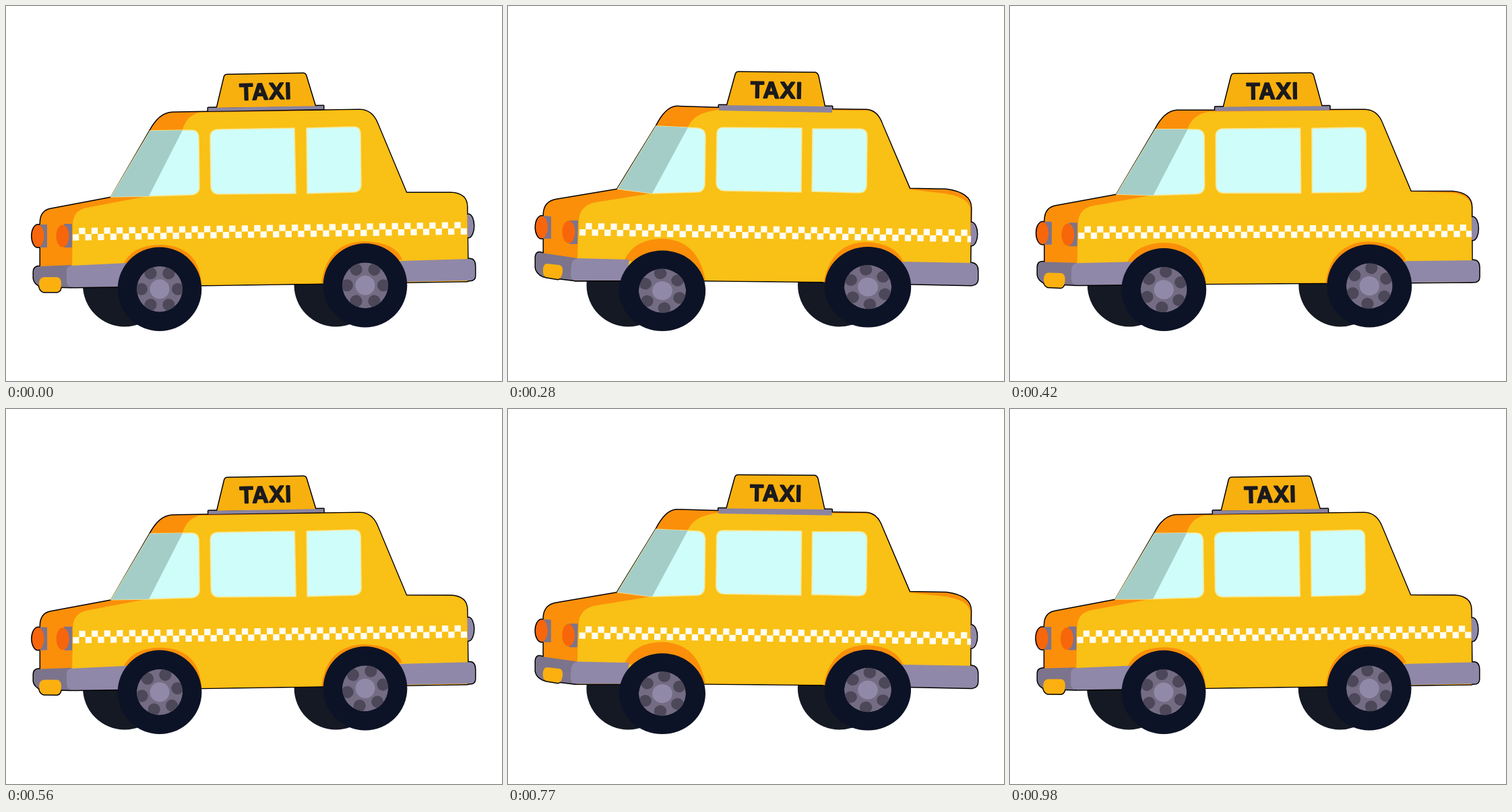
An HTML page that plays this animation: 736 px wide and 556 px high, repeating every 1.05 s.

```html
<!DOCTYPE html>
<html lang="en">
<head>
<meta charset="utf-8">
<title>Taxi</title>
<style>
  html, body { margin: 0; width: 100%; height: 100%; overflow: hidden; background: #fff; }
  svg { display: block; width: 736px; height: 556px; }
  #edge path { fill: #000; stroke: #000; stroke-width: 3; stroke-linejoin: round; }
  .glass { stroke: #f8e68f; stroke-width: 1.6; }
  text { font: 600 32.5px Inter, "Open Sans", sans-serif; text-anchor: middle; letter-spacing: .9px;
         fill: #1b1a1e; stroke: #1b1a1e; stroke-width: 2; stroke-linejoin: round; }
</style>
</head>
<body>
<svg viewBox="0 0 736 556">
  <defs>
    <clipPath id="rim"><circle r="34"/></clipPath>
    <g id="hub" clip-path="url(#rim)">
      <circle r="34" fill="#736c83"/>
      <g id="holes" fill="#4c4759"></g>
      <circle r="14.5" fill="#9189a8"/>
    </g>
  </defs>
  <g id="far"></g>
  <g id="edge"></g>
  <g id="body"></g>
  <text id="label">TAXI</text>
  <g id="wheels"></g>
</svg>
<script>
const NS = 'http://www.w3.org/2000/svg';
const $ = id => document.getElementById(id);
const FRAME = 70;
// Body tilt per step: 0 = nose down, 1 = nose up
const TILT = [0, .3, .65, .92, 1, .7, .33, .05, .03, .33, .65, .95, .95, .64, .08];

const YELLOW = '#f9c015', ORANGE = '#fb8f0a', LAMP = '#f7660b';
const GRAY = '#9088a8', DARK_GRAY = '#7c748c', GLASS = '#cffdf9', SHADE = '#a5cdc8';

const moving = [];

function add(parent, tag, attrs) {
  const el = document.createElementNS(NS, tag);
  for (const name in attrs) el.setAttribute(name, attrs[name]);
  return parent.appendChild(el);
}

function bind(el, attr, low, high) {
  moving.push({ el, attr, low, high: high.match(/-?[\d.]+/g).map(Number) });
  return el;
}

function mix({ low, high }, k) {
  let i = 0;
  return low.replace(/-?[\d.]+/g, n => +(+n + (high[i++] - n) * k).toFixed(3));
}

const oval = (x, y, rx, ry) =>
  `M${x - rx} ${y} A${rx} ${ry} 0 1 1 ${x + rx} ${y} A${rx} ${ry} 0 1 1 ${x - rx} ${y}Z`;

function shape(fill, low, high, outlined) {
  if (outlined) bind(add($('edge'), 'path', {}), 'd', low, high);
  return bind(add($('body'), 'path', { fill }), 'd', low, high);
}

function pane(low, high) {
  shape(GLASS, low, high).setAttribute('class', 'glass');
}

function checks(low, high, offset) {
  const cell = 585 / 63;
  const el = add($('body'), 'path', {
    fill: 'none', stroke: '#fffdf0', 'stroke-width': cell,
    'stroke-dasharray': cell, 'stroke-dashoffset': offset * cell
  });
  bind(el, 'd', low, high);
}

function wheel(x, y) {
  const g = add($('wheels'), 'g', {});
  bind(g, 'transform', `translate(${x} ${y}) scale(1 1)`, `translate(${x + 1} ${y}) scale(1.03 .96)`);
  add(g, 'circle', { cy: -62.3, r: 62.3, fill: '#0d1326' });
  return add(add(g, 'g', { transform: 'translate(0 -62.3)' }), 'use', { href: '#hub' });
}

// Far wheels
for (const x of [176, 489.5])
  bind(add($('far'), 'path', { fill: '#141923' }), 'd', oval(x, 413.5, 62, 62), oval(x + 2.5, 413.5, 62, 62));

// Tail light and shell
shape(GRAY, oval(686, 326, 8, 17), oval(687.5, 338, 8.5, 17), true);
shape(ORANGE,
  'M51 388 L51 322 Q51 304 66 301 L156 284 L213 186 Q227 159 246 158 L300 157 L524 154 Q543 154 551 174 L594 277 L660 277 Q684 278 684 298 L685 376 L685 408 L290 414 L100 412Z',
  'M53 372 L53 308 Q54 290 72 287 L162 272 L220 178 Q234 150 250 149 L312 151 L532 154 Q548 155 555 175 L596 271 L650 272 Q687 277 687 299 L686 380 L686 411 L290 407 L100 407Z', true);
shape(YELLOW,
  'M98 385 L99 325 Q99 303 120 299 L204 283 L262 183 Q268 163 286 158 L524 154 Q543 154 551 174 L594 277 L660 277 Q684 278 684 298 L685 376 L685 408 L290 414 L98 410Z',
  'M103 375 L105 318 Q106 296 130 291 L212 278 L267 180 Q275 158 312 154 L532 155 Q548 156 555 175 L596 272 L640 277 Q686 282 686 303 L686 380 L686 411 L290 407 L103 407Z');

// Windows
pane(
  'M156 283 L214 185 L275 184 Q286 184 286 196 L287 268 Q287 279 275 280 L212 282Z',
  'M163 271 L220 178 L282 181 Q292 182 293 192 L292 264 Q291 276 280 276 L214 278Z');
shape(SHADE, 'M156 283 L214 185 L262 184 L212 282Z', 'M163 271 L220 178 L267 180 L214 278Z');
pane(
  'M314 183 L428 181 L430 278 L316 279 Q305 279 304 268 L303 194 Q303 184 314 183Z',
  'M320 180 L436 181 L435 276 L320 274 Q310 273 309 263 L310 190 Q310 180 320 180Z');
pane(
  'M446 181 L516 179 Q526 179 526 190 L527 265 Q527 275 516 276 L447 278Z',
  'M452 182 L523 182 Q533 183 533 193 L532 267 Q531 277 521 277 L451 275Z');

// Checker stripe
checks('M99 333.8 L684 324.8', 'M106 326.3 L687 336.3', 1);
checks('M99 343.1 L684 334.1', 'M106 335.6 L687 345.6', 0);

// Wheel arches
shape(ORANGE, 'M173 385 Q186 354 230 354 Q288 356 290 414Z', 'M173 376 Q188 345 230 345 Q282 347 293 407Z');
shape(ORANGE, 'M468 411 Q476 350 532 349 Q578 350 588 376Z', 'M468 410 Q480 350 533 350 Q575 352 587 380Z');

// Bumpers and fog light
shape(DARK_GRAY,
  'M41 394 Q41 386 50 386 L97 384 L97 417 L52 416 Q42 412 41 404Z',
  'M41 372 Q42 363 50 366 L103 374 L100 407 L52 401 Q42 396 41 388Z', true);
shape(GRAY,
  'M97 385 L180 381 L175 416 L100 417 Q90 417 90 408 L90 392 Q90 386 97 385Z',
  'M103 374 L180 376 L175 407 L103 407 Q93 407 93 399 L94 384 Q95 376 103 374Z', true);
shape(GRAY,
  'M585 378 L688 375 Q696 375 696 386 L696 400 Q696 407 688 407 L590 409Z',
  'M585 379 L688 381 Q697 382 697 393 L697 405 Q697 413 688 414 L590 412Z', true);
shape('#fbb00f',
  'M56 402 L76 402 Q82 403 82 412 Q82 423 76 424 L56 424 Q49 422 49 412 Q49 403 56 402Z',
  'M58 382 L76 384 Q82 385 81 394 Q80 404 74 405 L56 402 Q51 399 52 390 Q53 382 58 382Z', true);

// Headlights
shape(DARK_GRAY, 'M50 324 L61 324 L61 358 L50 358Z', 'M52 311 L64 312 L64 345 L52 345Z');
shape(LAMP, oval(47.5, 341, 9, 16.5), oval(50, 328, 9, 16.5), true);
shape(DARK_GRAY, 'M86 323 L98 323 L98 358 L86 358Z', 'M91 318 L104 318 L103 353 L91 353Z');
shape(LAMP, oval(84, 341, 9.5, 16.5), oval(90, 335, 9.5, 16.5));

// Roof sign
shape('#f8b00e',
  'M313 151 L324 105 Q325 102 328 102 L441 100 Q444 100 445 103 L459 149Z',
  'M325 148 L338 101 Q339 98 342 98 L456 99 Q459 100 460 103 L470 150Z', true);
shape('#8b84a0', 'M300 151 L471 148 L471 153 L300 156Z', 'M313 147 L481 149 L481 158 L313 155Z', true);
bind($('label'), 'transform', 'translate(385 138.5) rotate(-1.5)', 'translate(398 136.5) rotate(1)');

// Near wheels
for (let i = 0; i < 6; i++)
  add($('holes'), 'circle', { cx: 27, r: 9, transform: `rotate(${i * 60})` });
const hubs = [wheel(228, 482), wheel(533, 476.5)];

function draw(now) {
  const step = Math.floor(now / FRAME) % TILT.length;
  for (const m of moving) m.el.setAttribute(m.attr, mix(m, TILT[step]));
  for (const h of hubs) h.setAttribute('transform', `rotate(${-step * 360 / TILT.length})`);
}

const start = performance.now();
function tick() {
  draw(performance.now() - start);
  requestAnimationFrame(tick);
}
tick();
</script>
</body>
</html>
```
